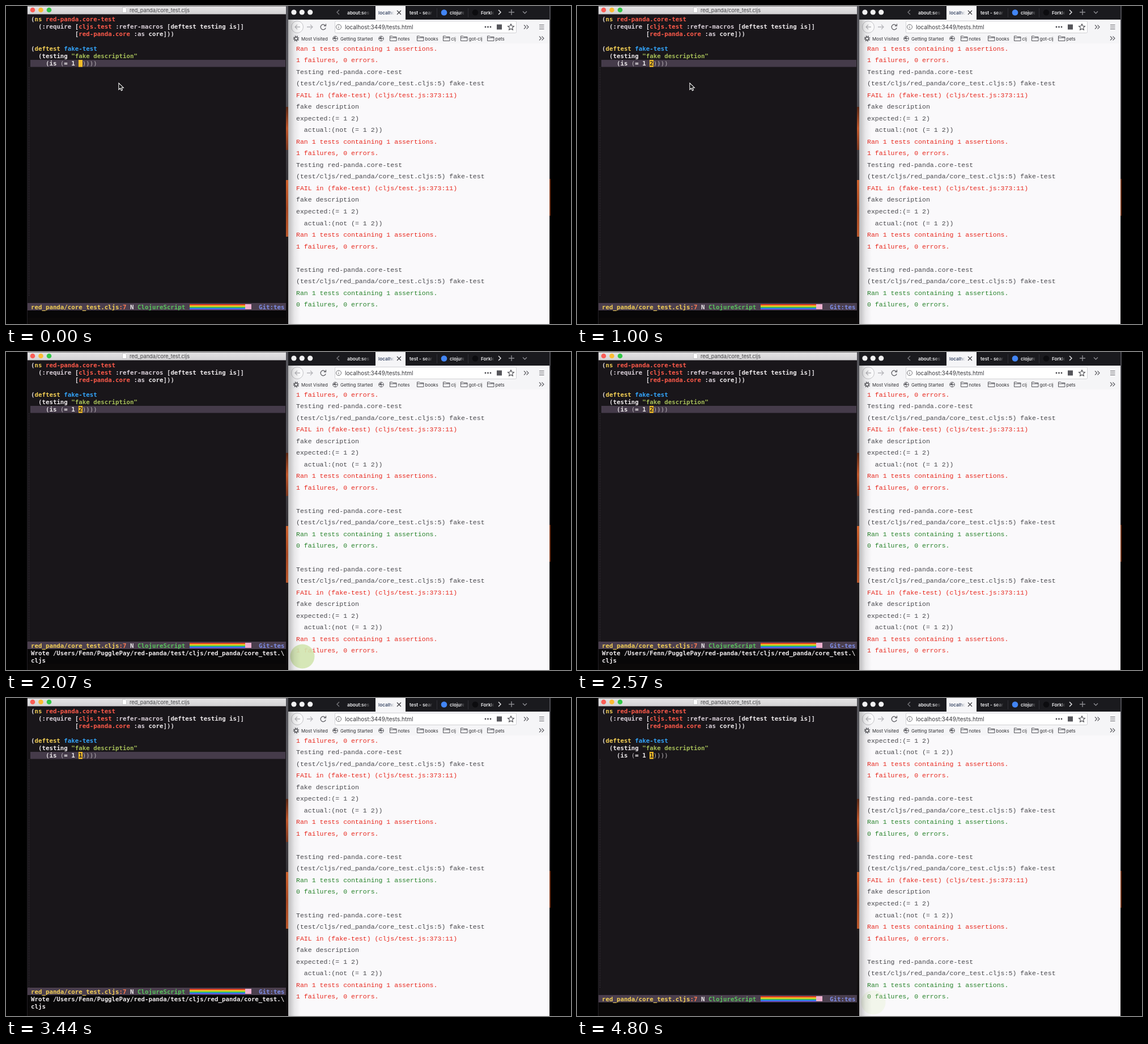
Write an HTML page with a canvas that moves like this. It is 997 by 561 pixels and loops after 4.83 s.

```html
<!DOCTYPE html>
<html lang="en">
<head>
<meta charset="utf-8">
<title>Test runner</title>
<style>
  html, body { margin: 0; width: 100%; height: 100%; overflow: hidden; background: #000; }
  canvas { display: block; }
</style>
</head>
<body>
<canvas id="stage" width="997" height="561"></canvas>
<script>
const ctx = document.getElementById('stage').getContext('2d');
const LOOP = 4830;
const CHAR = 6.484;
const CODE = '10.77px "DejaVu Sans Mono", monospace';
const LOG = '11.56px "Liberation Mono", monospace';
const ui = (size, weight = 400) => `${weight} ${size}px Inter, sans-serif`;

const WHITE = '#eeeaec', BRACKET = '#dedadd', DIM = '#b9b3b8', YELLOW = '#f3cf55',
      RED = '#ff5a4a', BLUE = '#33a4fa', STRING = '#a5bd58',
      BAR = '#1a1a1e', CHROME = '#f5f5f7', INK = '#48484d';

function rect(x, y, w, h, color) {
  ctx.fillStyle = color;
  ctx.fillRect(x, y, w, h);
}

function disc(x, y, r, color) {
  ctx.fillStyle = color;
  ctx.beginPath();
  ctx.arc(x, y, r, 0, 7);
  ctx.fill();
}

function text(str, x, y, color, font) {
  ctx.font = font;
  ctx.fillStyle = color;
  ctx.fillText(str, x, y);
}

function stroke(d, color, width = 1.2) {
  ctx.strokeStyle = color;
  ctx.lineWidth = width;
  ctx.stroke(new Path2D(d));
}

const ring = (x, y, r) => `M${x - r} ${y}a${r} ${r} 0 1 0 ${2 * r} 0a${r} ${r} 0 1 0 ${-2 * r} 0`;

function gradient(x0, y0, x1, y1, ...colors) {
  const g = ctx.createLinearGradient(x0, y0, x1, y1);
  colors.forEach((c, i) => g.addColorStop(i / (colors.length - 1), c));
  return g;
}

// Draws alternating colour / text pairs on the character grid.
function code(col, y, ...parts) {
  for (let i = 0; i < parts.length; i += 2) {
    const [color, str] = [parts[i], parts[i + 1]];
    text(str, 44 + col * CHAR, y, color, (color === DIM ? '' : 'bold ') + CODE);
    col += str.length;
  }
}

const head = ['Testing red-panda.core-test', '(test/cljs/red_panda/core_test.cljs:5) fake-test'];
const ran = 'Ran 1 tests containing 1 assertions.';
const colored = (color, ...lines) => lines.map(str => ({ str, color }));
const fail = [
  ...colored(INK, ...head),
  ...colored('#e8291f', 'FAIL in (fake-test) (cljs/test.js:373:11)'),
  ...colored(INK, 'fake description', 'expected:(= 1 2)', '  actual:(not (= 1 2))'),
  ...colored('#e8291f', ran, '1 failures, 0 errors.')
];
const pass = [...colored(INK, ...head), ...colored('#27832b', ran, '0 failures, 0 errors.')];
const gap = colored(INK, '');
const log = [...fail.slice(6), ...fail, ...fail, ...gap, ...pass, ...gap, ...fail, ...gap, ...pass];

function desktop() {
  rect(0, 0, 997, 561, '#000');
  rect(37, 0, 1, 561, '#222024');
  rect(494, 0, 4, 561, gradient(0, 0, 0, 561, '#55555b', '#57575d', '#3b393d', '#1c191b', '#0c0a0b'));
  rect(494, 178, 4, 76, gradient(0, 178, 0, 254, '#5a2a18', '#c0582c', '#7a3820'));
  rect(494, 307, 4, 100, gradient(0, 307, 0, 407, '#d0632e', '#a84a24', '#b9572b'));
  rect(959, 0, 2, 561, gradient(0, 0, 0, 561, '#4c4c52', '#3a383c', '#1a1718', '#0a0808'));
  rect(959, 305, 2, 65, '#7a3a20');
}

function modeLine(y, git) {
  rect(38, y, 456, 13, '#4a3e4d');
  code(0, y + 10.5, YELLOW, 'red_panda/core_test.cljs', '#ff7a52', ':7', WHITE, ' N ',
    '#58c45c', 'ClojureScript');
  ['#f02a20', '#ff9a1c', '#ffee30', '#3fd32c', '#1a9cf5', '#6a4be0']
    .forEach((c, i) => rect(324, y + 2 + i * 1.6, 98, 1.6, c));
  rect(422, y + 2, 11, 9, '#eeb0cf');
  code(62, y + 10.5, '#7d8ce6', git);
}

function pointer() {
  const arrow = new Path2D('M199 136v11.5l2.7-2.5 1.8 4.2 2-.9-1.8-4.1h3.6z');
  ctx.fillStyle = '#000';
  ctx.fill(arrow);
  ctx.strokeStyle = '#fff';
  ctx.lineWidth = 1.1;
  ctx.stroke(arrow);
}

function editor(t) {
  const saved = t >= 1080 && t < 2960 || t >= 3400 && t < 4740;
  const highlighted = t < 4770 && !(t >= 2960 && t < 3030);
  const digit = t < 300 ? '' : t < 3030 ? '2' : t < 3270 ? '' : '1';
  const git = t >= 1080 && t < 3400 ? 'Git-tes' : 'Git:tes';

  rect(38, 0, 456, 550, '#19161a');
  rect(38, .5, 456, 14, gradient(0, 0, 0, 14, '#e6e5e6', '#d3d2d4'));
  ['#fb5e57', '#fcbc33', '#32c746'].forEach((c, i) => disc(47 + i * 14.5, 7, 4.3, c));
  rect(205.5, 2.5, 7, 9, '#fff');
  stroke('M205.5 2.5h5l2 2v7h-7z', '#b5b5b8', .7);
  text('red_panda/core_test.cljs', 218, 10.7, '#454548', ui(9.2));

  ctx.setLineDash([1, 2]);
  stroke('M40.5 108V511', '#454047', 1);
  ctx.setLineDash([]);

  if (highlighted) rect(43, 95, 450, 12.5, '#453b4a');
  code(0, 26.8, BRACKET, '(', YELLOW, 'ns ', RED, 'red-panda.core-test');
  code(2, 39.8, BRACKET, '(', '#d9cfd8', ':require ', BRACKET, '[', RED, 'cljs.test ',
    '#d9cfd8', ':refer-macros ', BRACKET, '[', WHITE, 'deftest testing is', BRACKET, ']]');
  code(12, 52.8, BRACKET, '[', RED, 'red-panda.core ', '#d9cfd8', ':as ', WHITE, 'core', BRACKET, ']))');
  code(0, 78.8, BRACKET, '(', YELLOW, 'deftest ', BLUE, 'fake-test');
  code(2, 91.8, BRACKET, '(', WHITE, 'testing ', STRING, '"fake description"');
  code(4, 104.8, BRACKET, '(', WHITE, 'is ', DIM, '(', WHITE, '= 1');
  code(14, 104.8, DIM, '))))');
  rect(128, 95, 7, 12.5, '#f5bd28');
  code(13, 104.8, '#302822', digit);

  rect(38, saved ? 511 : 524, 456, 39, '#080708');
  rect(38, 550, 456, 11, '#0b0909');
  modeLine(saved ? 511 : 524, git);
  if (saved) {
    code(0, 534.5, WHITE, 'Wrote /Users/Fenn/PugglePay/red-panda/test/cljs/red_panda/core_test.\\');
    code(0, 547.5, WHITE, 'cljs');
  }
  if (t < 1080) pointer();
}

function tab(str, x, end, color, clear) {
  text(str, x, 15, gradient(x, 0, end, 0, color, color, color, clear), ui(8.2, 600));
}

function globe(x) {
  stroke(ring(x, 57.5, 4.3) + `M${x - 4} 57.5h8M${x} 53.5v8`, '#55555a', 1);
  disc(x - 1.3, 56.5, 1.6, '#55555a');
}

function folder(x, label) {
  stroke(`M${x} 61.5v-8.5h4l1.5 1.5h6v7zM${x} 56h11.5`, '#55555a', 1);
  text(label, x + 14, 60.5, '#2f2f33', ui(8));
}

function browserChrome() {
  rect(498, 0, 461, 24, BAR);
  [508, 522.3, 536.7].forEach(x => disc(x, 11, 4.6, '#f1f1f2'));
  stroke('M588 7l-4 4 4 4', '#77777c', 1.4);
  tab('about:ses', 602, 643, '#f0f0f2', BAR);
  rect(652, 0, 53, 24, CHROME);
  tab('localho', 657, 685, '#3c4a68', CHROME);
  stroke('M690 8l7 7M697 8l-7 7', '#3e3e43', 1.3);
  tab('test - sear', 712, 753, '#f0f0f2', BAR);
  disc(773, 11.5, 5.3, '#4285f4');
  tab('clojure', 783, 809, '#f0f0f2', BAR);
  disc(828, 11.5, 5.2, '#0c0c0f');
  tab('Forkle', 838, 861, '#f0f0f2', BAR);
  stroke('M760.5 4v16M815.5 4v16', '#303036', 1);
  stroke('M869 7l4 4-4 4', '#e0e0e3', 1.5);
  stroke('M887 11h10M892 6v10M912 9.5l3.5 3.5 3.5-3.5', '#8b8b90', 1.4);

  rect(498, 24, 461, 42, CHROME);
  disc(514, 37, 10.5, '#fafafb');
  stroke(ring(514, 37, 10.5), '#c4c4c8', 1);
  stroke('M519 37h-9M514 33l-4 4 4 4M531 37h10M537 33l4 4-4 4', '#b6b6ba', 1.3);
  stroke('M563.6 34.5a4.6 4.6 0 1 0 .6 4M564.5 31.5v3.5h-3.5', '#66666b', 1.3);
  ctx.beginPath();
  ctx.roundRect(580.5, 26.5, 320, 21, 2);
  ctx.fillStyle = '#fff';
  ctx.fill();
  ctx.strokeStyle = '#d0d0d4';
  ctx.lineWidth = 1;
  ctx.stroke();
  stroke(ring(587, 37, 4.5) + 'M587 36.3v3.2M587 34.2v1', '#707075', 1);
  text('localhost:3449/tests.html', 598, 40.7, '#38383d', ui(10));
  [846, 850.5, 855].forEach(x => disc(x, 37, 1.4, '#4c4c51'));
  rect(866, 32.5, 9, 9, '#55555a');
  stroke('M891 31.8l1.6 3.5 3.8.4-2.8 2.6.8 3.8-3.4-1.9-3.4 1.9.8-3.8-2.8-2.6 3.8-.4z', '#4c4c51', 1.1);
  stroke('M914 33.5l3.5 3.5-3.5 3.5M918.5 33.5l3.5 3.5-3.5 3.5', '#606065');
  stroke('M941 33.5h8.5M941 37h8.5M941 40.5h8.5', '#606065', 1.1);

  stroke(ring(512, 57.5, 2.8), '#55555a', 1.4);
  ctx.setLineDash([1.6, 1.86]);
  stroke(ring(512, 57.5, 4.4), '#55555a', 1.6);
  ctx.setLineDash([]);
  text('Most Visited', 521, 60.5, '#2f2f33', ui(8));
  globe(581);
  text('Getting Started', 590, 60.5, '#2f2f33', ui(8));
  globe(662);
  folder(677.5, 'notes');
  folder(725.5, 'books');
  folder(771.5, 'clj');
  folder(802.5, 'got-clj');
  folder(849.5, 'pets');
  stroke('M941 53.5l3.5 3.5-3.5 3.5M945.5 53.5l3.5 3.5-3.5 3.5', '#606065');
}

// The reload badge slides up, stays and fades out.
function badge(age) {
  if (age < 0 || age > 750) return;
  const rise = 1 - (1 - Math.min(age / 250, 1)) ** 2;
  const alpha = .9 * Math.min(age / 40, 1, (750 - age) / 100);
  ctx.globalAlpha = Math.max(alpha, 0);
  disc(523, 546 - 9 * rise, 21.5, '#d3e6b0');
  ctx.globalAlpha = 1;
}

function browser(t) {
  const first = t < 1750 ? 0 : t < 4120 ? 9 : 14;
  rect(498, 66, 461, 495, '#faf9fb');
  log.slice(first, first + 23).forEach(({ str, color }, row) =>
    text(str, 512, 78.7 + row * 20.52, color, LOG));
  browserChrome();
  badge(t - 1640);
  badge(t - 4075);
  // Shadow of the editor window
  rect(498, 24, 22, 537, gradient(498, 0, 520, 0, 'rgba(0,0,0,.25)', 'rgba(0,0,0,.07)', 'rgba(0,0,0,0)'));
}

function draw(now) {
  const t = now % LOOP;
  desktop();
  editor(t);
  browser(t);
  requestAnimationFrame(draw);
}
draw(performance.now());
</script>
</body>
</html>
```
